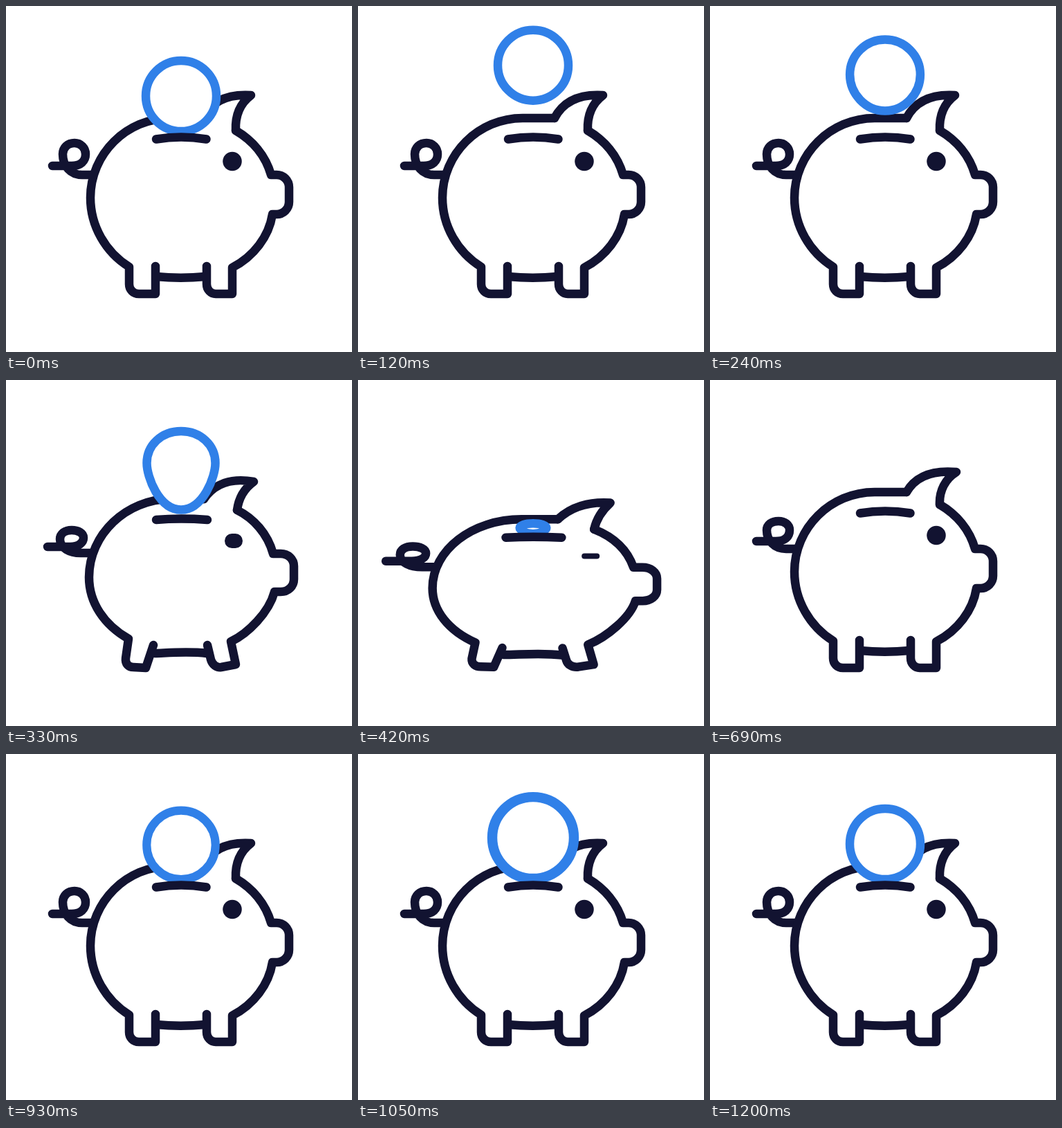
An HTML page that plays this animation: 500 by 500 pixels, repeating every 1270 ms.

```html
<!DOCTYPE html>
<html lang="en">
<head>
<meta charset="utf-8">
<title>Piggy bank</title>
<style>
html, body { margin: 0; width: 100%; height: 100%; overflow: hidden; background: #fff; }
svg { display: block; width: 100%; height: 100%; }
path { fill: none; stroke: #121331; stroke-width: 12.5; stroke-linecap: round; stroke-linejoin: round; }
#coin { fill: #fff; stroke: #3080e8; }
#eye { fill: #121331; }
</style>
</head>
<body>
<svg viewBox="0 0 500 500">
  <path id="tail"/><path id="back"/><path id="ear"/><path id="head"/><path id="belly"/>
  <rect id="eye"/>
  <path id="coin"/>
  <path id="slot"/>
</svg>
<script>
const LOOP = 1270, STEP = 30, LAST = 1200;
const HIT = 330, RISE = 510;
const $ = id => document.getElementById(id);
const lerp = (a, b, u) => a + (b - a) * u;
const clamp = u => Math.max(0, Math.min(1, u));
const span = (t, a, b) => clamp((t - a) / (b - a));
const easeOut = u => Math.sin(u * Math.PI / 2);
const easeInOut = u => (1 - Math.cos(u * Math.PI)) / 2;
const NUM = /[\d.]+/g;

// Each part: rest, pressed, rebound and, where it trails behind, settle.
const parts = {
  tail: [
    "M67 231L95 231C108 231 115 224 115 214C115 205 108 198 99 198C89 198 82 205 82 214C82 231 93 244 110 244L124 244",
    "M60 241L93 241C105 241 112 235 112 228C112 221 104 217 95 217C85 217 78 222 78 230C78 243 92 250 108 250L122 250",
    "M64 240.5L98 240.5C110 240 116 235 116 228C116 220 108 216 99 216C89 216 83 222 83 231C83 243 95 251 110 251L126 251",
    "M67 233L95 233C108 233 115 227 115 217C115 209 108 204 99 204C89 204 82 209 82 217C82 232 93 244 110 244L124 244"
  ],
  back: [
    "M216 376L216 416L192 416C184 416 178 410 178 402L178 377C144 356 122 318 122 277C122 214 174 162 238 162L284 162",
    "M213 383L202 416L184 415C177 415 172 410 173 402L177 374C142 354 120 322 120 285C120 223 174 172 238 172L286 172",
    "M213 383L202 413L186 413C179 413 174 408 174 400L179 375C145 356 125 322 125 285C125 222 174 172 238 172L284 172"
  ],
  ear: [
    "M284 162C297 137 322 127 354 129C338 141 331 158 332 180",
    "M286 172C301 150 326 141 358 147C344 157 336 172 334 188",
    "M284 172C302 154 325 144 348 143C340 158 334 172 330 189",
    "M284 162C297 139 322 130 356 133C340 143 331 160 332 180"
  ],
  head: [
    "M332 180C356 194 375 216 383 244L391 244C401 244 409 252 409 262L409 283C409 293 401 301 391 301L385 301C380 333 358 362 327 378L327 416L303 416C296 416 290 410 290 402L290 376",
    "M334 188C358 200 378 222 386 251L397 251C408 251 416 259 416 269L416 288C416 298 408 306 397 306L388 306C380 336 350 366 325 378L332 411L311 415C304 416 298 411 296 404L291 383",
    "M330 189C356 202 372 222 380 251L392 251C403 251 411 259 411 270L411 287C411 298 403 306 393 306L383 306C378 330 348 364 323 378L331 410L311 414C303 415 297 410 296 403L291 384"
  ],
  belly: [
    "M217 391C238 393 267 393 288 391",
    "M215 395C240 394 265 392 290 395",
    "M214 394C240 394 266 390 290 395"
  ],
  slot: [
    "M217 192.5C241 188.5 265 188.5 289.5 192.5",
    "M217 202C241 200 265 200 291 202",
    "M218 202C241 201 265 201 289 202"
  ]
};
const eyes = [[327, 224.5, 27.5, 27.5], [329, 232.5, 26, 21], [326, 232.5, 26, 19]];

const shapes = {};
for (const id in parts) {
  shapes[id] = { text: parts[id][0], poses: parts[id].map(d => d.match(NUM).map(Number)) };
}

const blend = (a, b, u) => a.map((v, i) => lerp(v, b[i], u));

function pose(p, t) {
  const [rest, press, rebound, settle] = p;
  if (t < HIT) return blend(rest, press, span(t, 270, HIT) ** 2);
  if (t < RISE) return blend(press, rebound, span(t, HIT, RISE));
  if (t < 580) return blend(rebound, rest, easeOut(span(t, RISE, 580)));
  if (!settle) return rest;
  return t < 690
    ? blend(rest, settle, easeInOut(span(t, 580, 690)))
    : blend(settle, rest, easeInOut(span(t, 690, 750)));
}

// Flatten the whole pig around its feet.
const squash = t => Math.sin(Math.PI * span(t, HIT, RISE));
const flatX = (x, s) => 252 + (x - 252) * (1 + 0.115 * s);
const flatY = (y, s) => 416 + (y - 416) * (1 - 0.12 * s);

function drawPig(t) {
  const s = squash(t);
  for (const id in shapes) {
    const p = pose(shapes[id].poses, t);
    let i = 0;
    $(id).setAttribute("d", shapes[id].text.replace(NUM, () => {
      const v = i % 2 ? flatY(p[i], s) : flatX(p[i], s);
      i++;
      return v.toFixed(2) + " ";
    }));
  }
  const [x, y, w, h0] = pose(eyes, t);
  const h = h0 * (1 - 0.6 * s);
  const attrs = { x: flatX(x, s) - w / 2, y: flatY(y, s) - h / 2, width: w, height: h, rx: Math.min(w, h) / 2 };
  for (const k in attrs) $("eye").setAttribute(k, attrs[k]);
}

// Coin values: top, upper handle, widest, lower handle, bottom, half width, top handle, bottom handle.
const K = 0.5523;
const disc = (c, r) => [c - r, c - K * r, c, c + K * r, c + r, r, K * r, K * r];
const drop = [74, 94, 120, 140, 187.5, 49.5, 28, 32];
const gone = [222, 223, 224, 225, 226, 16, 10, 10];

function coinShape(t) {
  if (t <= 140) return disc(lerp(130, 84.5, easeOut(t / 140)), 51);
  if (t <= HIT) {
    const u = span(t, 140, HIT);
    return blend(disc(lerp(84.5, 131, u * u), 51), drop, u ** 4);
  }
  if (t < 430) return blend(drop, gone, span(t, HIT, 430));
  return null;
}

function popScale(t) {
  if (t < 930) return 0.975 * span(t, 840, 930);
  if (t < 985) return lerp(0.975, 1.2, easeOut(span(t, 930, 985)));
  return lerp(1.2, 1, easeInOut(span(t, 985, 1195)));
}

function drawCoin(t) {
  const coin = $("coin");
  const k = t < 800 ? 1 : popScale(t);
  const shape = t < 800 ? coinShape(t) : disc(130, 51);
  const shown = shape && k > 0;
  coin.style.display = shown ? "" : "none";
  if (!shown) return;
  const [top, up, mid, low, bottom, w, a, b] = shape, c = 253;
  coin.setAttribute("d",
    `M${c} ${top}C${c + a} ${top} ${c + w} ${up} ${c + w} ${mid}` +
    `C${c + w} ${low} ${c + b} ${bottom} ${c} ${bottom}` +
    `C${c - b} ${bottom} ${c - w} ${low} ${c - w} ${mid}` +
    `C${c - w} ${up} ${c - a} ${top} ${c} ${top}Z`);
  coin.setAttribute("transform", `translate(253 187) scale(${k}) translate(-253 -187)`);
}

function draw(now) {
  const t = Math.min(LAST, Math.floor((now % LOOP) / STEP) * STEP);
  drawPig(t);
  drawCoin(t);
}

function tick() {
  draw(performance.now());
  requestAnimationFrame(tick);
}
tick();
</script>
</body>
</html>
```
